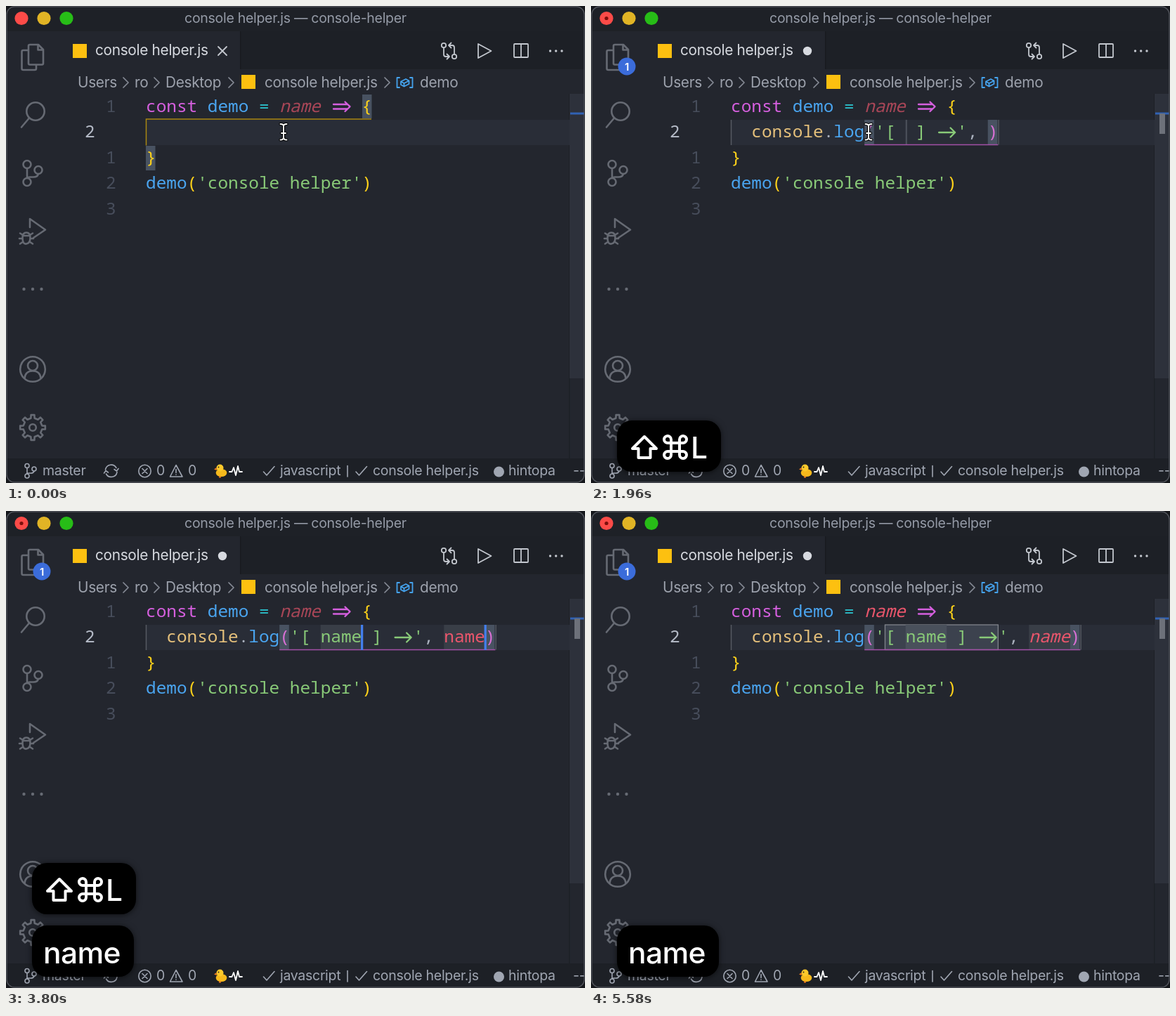
An HTML page for the animation above (5680 ms loop, 824 by 679 pixels).

```html
<!DOCTYPE html>
<html lang="en">
<head>
<meta charset="utf-8">
<title>Console helper demo</title>
<style>
  html, body { margin: 0; width: 100%; height: 100%; overflow: hidden; background: #15171b; }
  svg { display: block; position: absolute; left: 0; top: 0; }
  text { white-space: pre; font-family: Inter, "Open Sans", sans-serif; letter-spacing: -.015em; }
  .code text { font: 500 24.4px "Noto Sans Mono", "DejaVu Sans Mono", monospace; letter-spacing: 0; }
  .code .italic { font-style: italic; }
  .line { fill: none; stroke-linejoin: round; stroke-linecap: round; }
  .side { stroke: #666a73; stroke-width: 2.6; }
  .tool { stroke: #c3c7ce; stroke-width: 1.8; }
  .tab { font-size: 20.8px; fill: #d7dae0; }
  .crumb { font-size: 20.8px; fill: #9da2ad; }
  .status { font-size: 19.5px; fill: #a0a6b2; }
  .state { stroke: #a0a6b2; stroke-width: 1.6; }
  .keys text { font-size: 42.5px; font-weight: 500; fill: #fff; }
  .keys rect { filter: drop-shadow(0 1px 4px rgba(0, 0, 0, .6)); }
</style>
</head>
<body>
<svg width="824" height="679" viewBox="0 0 824 679">
  <!-- window -->
  <rect x=".75" y=".75" width="822.5" height="677.5" rx="11" fill="#23262e"/>
  <path d="M1 36V12Q1 1 12 1H812Q823 1 823 12V36Z" fill="#1e2127"/>
  <rect x="334" y="36" width="489" height="54" fill="#1d2026"/>
  <rect x="333" y="36" width="1.5" height="54" fill="#181a1f"/>
  <path d="M1 644H823V667Q823 678 812 678H12Q1 678 1 667Z" fill="#1d2026"/>

  <!-- title bar -->
  <circle cx="22" cy="17.5" r="9.6" fill="#fc4b48"/>
  <circle cx="22" cy="17.5" r="2.6" fill="#7d0f0c" data-on="160"/>
  <circle cx="54" cy="17.5" r="9.6" fill="#e1b425"/>
  <circle cx="86" cy="17.5" r="9.6" fill="#27bd17"/>
  <text x="412" y="24" text-anchor="middle" font-size="19.5" fill="#959ba7">console helper.js — console-helper</text>

  <!-- tab -->
  <rect x="95" y="54" width="20" height="20" fill="#fdc010"/>
  <text class="tab" x="127" y="70">console helper.js</text>
  <path class="line tool" d="M302 58L314 70M314 58L302 70" data-on="0 160"/>
  <circle cx="308" cy="64" r="6.2" fill="#d7dae0" data-on="160"/>

  <!-- editor actions -->
  <g class="line tool">
    <circle cx="623" cy="56" r="3.2"/><circle cx="638" cy="72" r="3.2"/>
    <path d="M623 59.5V69Q623 72 626 72H631M627.5 68.5L631 72L627.5 75.5"/>
    <path d="M638 68.5V59Q638 56 635 56H630M633.5 52.5L630 56L633.5 59.5"/>
    <path d="M672 54V74L690.5 64Z"/>
    <rect x="723" y="54" width="20" height="19" rx="1"/><path d="M733 54V73"/>
  </g>
  <g fill="#c3c7ce"><circle cx="774.5" cy="64" r="1.7"/><circle cx="782.7" cy="64" r="1.7"/><circle cx="791" cy="64" r="1.7"/></g>

  <!-- breadcrumbs -->
  <g class="crumb">
    <text x="102" y="116">Users</text><text x="183" y="116">ro</text>
    <text x="227" y="116">Desktop</text><text x="368" y="116">console helper.js</text>
    <text x="589" y="116">demo</text>
  </g>
  <path class="line" stroke="#858a95" stroke-width="1.7" d="M167 102l7 7l-7 7M211 102l7 7l-7 7M317 102l7 7l-7 7M539 102l7 7l-7 7"/>
  <rect x="335" y="98" width="20" height="20" fill="#fdc010"/>
  <path class="line" stroke="#45a3ee" stroke-width="1.8" d="M560 102H556.5V116H560M575 102H578.5V116H575M562 107.5L569 104L573.5 106.5V111L566.5 114.5L562 112ZM562 107.5L566.5 110L573.5 106.5M566.5 110V114.5"/>

  <!-- activity bar -->
  <g class="line side">
    <path d="M32 63H24.5Q22.5 63 22.5 65V89Q22.5 91 24.5 91H41Q43 91 43 89V84M34 55H46L53 62V81.5Q53 83.5 51 83.5H34Q32 83.5 32 81.5V57Q32 55 34 55ZM45.5 55V62.5H53"/>
    <circle cx="42" cy="150" r="12.7"/><path d="M33 159.5L22 172.5"/>
    <circle cx="30" cy="225.5" r="5.5"/><circle cx="46" cy="233.5" r="5.5"/><circle cx="30" cy="250.5" r="5.5"/>
    <path d="M30 231V245M46 239Q45 243.5 39 243.5H34Q31 243.5 30 245"/>
    <path d="M34 315V303L56 318.5L39 330"/>
    <path d="M23.5 330Q23.5 322.5 29 322.5T34.5 330T29 338.5T23.5 330ZM23.5 327H34.5M20 323.5L24 326M38 323.5L34 326M19 331H23.5M39 331H34.5M20 338.5L24.5 335.5M38 338.5L33.5 335.5"/>
    <circle cx="38" cy="517" r="17.8"/><circle cx="38" cy="512" r="7"/><path d="M26.5 530Q27.5 519.5 38 519.5T49.5 530"/>
    <path id="gear"/><circle cx="38" cy="600" r="4.8"/>
  </g>
  <g fill="#666a73"><circle cx="25.5" cy="403" r="2.2"/><circle cx="38" cy="403" r="2.2"/><circle cx="50.5" cy="403" r="2.2"/></g>
  <g data-on="160">
    <circle cx="51" cy="86" r="12.5" fill="#3b6cda"/>
    <text x="51" y="91.5" text-anchor="middle" font-size="15" font-weight="600" fill="#fff">1</text>
  </g>

  <!-- scroll bar -->
  <rect x="801" y="125" width="1.5" height="519" fill="#1d2026"/>
  <rect x="802" y="125" width="21" height="405" fill="#2d313b"/>
  <rect x="803" y="151.5" width="20" height="3" fill="#3162b4"/>
  <rect x="809" y="153" width="8" height="29" fill="#6d717a" data-on="560"/>

  <!-- editor -->
  <rect x="199" y="162" width="603" height="36" fill="#292d37"/>
  <g data-on="0 720">
    <rect x="507" y="126" width="13.5" height="34" fill="#485261"/>
    <rect x="199" y="199" width="13.5" height="35" fill="#485261"/>
    <path d="M520 161H199.5V198.5" fill="none" stroke="#a98712" stroke-width="1.5"/>
  </g>
  <path d="M199.5 162V198" stroke="#565a63" stroke-width="1.5" data-on="720"/>
  <g id="marks"></g>
  <g class="code" id="fixed"></g>
  <g class="code" id="typed"></g>
  <g id="carets" fill="#437fee"><rect y="162" width="3.2" height="36"/><rect y="162" width="3.2" height="36"/></g>
  <g class="line" data-on="0 2560">
    <path id="beam" d="M390.5 168Q395 168 395 171Q395 168 399.5 168M395 171V187M390.5 190.5Q395 190.5 395 187Q395 190.5 399.5 190.5M392 181H398"/>
    <use href="#beam" stroke="#000" stroke-width="4.2"/>
    <use href="#beam" stroke="#fff" stroke-width="1.9"/>
  </g>

  <!-- status bar -->
  <g class="line state">
    <circle cx="30" cy="654.5" r="3"/><circle cx="40" cy="659" r="3"/><circle cx="30" cy="669" r="3"/>
    <path d="M30 657.5V666M40 662Q39.5 665 35 665H32Q30 665 30 666"/>
    <path d="M141.5 660A8.3 8.3 0 0 1 157 657.5M158 663.5A8.3 8.3 0 0 1 142.5 666M160 658.5L157.5 662L154 659.5M139.5 665L142 661.5L145.5 664"/>
    <circle cx="197.5" cy="662" r="8.7"/><path d="M194 658.5L201 665.5M201 658.5L194 665.5"/>
    <path d="M242 653.5L251 670H233.5ZM242 659.5V664.5M242 667V667.3"/>
    <path d="M366.5 663L371 668L382 655.5M498 663L502.5 668L513.5 655.5"/>
    <path d="M486 654.5V670"/>
  </g>
  <g class="status">
    <text x="52" y="668">master</text><text x="214" y="668">0</text><text x="259" y="668">0</text>
    <text x="390" y="668">javascript</text><text x="522" y="668">console helper.js</text>
    <text x="715" y="668">hintopa</text><text x="807" y="668">--</text>
  </g>
  <circle cx="701.5" cy="663" r="7.5" fill="#a0a6b2"/>
  <ellipse cx="306.500" cy="664.5" rx="7.8" ry="5.5" fill="#f6b91c"/>
  <circle cx="304.5" cy="657.5" r="5" fill="#fbc92b"/>
  <path d="M299.5 657L296 659.5L300 661ZM303 669.5h3v2h-3Z" fill="#ee7a22"/>
  <circle cx="302.5" cy="656.5" r=".9" fill="#222"/>
  <path class="line" stroke="#fff" stroke-width="1.8" d="M318 663H321.5L324 657L327 668L330 655L332 663H336"/>

  <rect x="1" y="1" width="822" height="677" rx="11" fill="none" stroke="#50535a" stroke-width="1.4"/>

  <!-- pressed keys -->
  <g class="keys" id="chord">
    <rect x="37" y="590" width="148" height="73" rx="21"/>
    <g class="line" stroke="#fff" stroke-width="4">
      <path d="M76 613L93 630H84.5V643H67.5V630H59Z"/>
      <path d="M114 622H126V634H114ZM114 622H109.5A5 5 0 1 1 114 617ZM126 622V617A5 5 0 1 1 130.5 622ZM126 634H130.5A5 5 0 1 1 126 639ZM114 634V639A5 5 0 1 1 109.5 634Z"/>
    </g>
    <text x="142" y="644">L</text>
  </g>
  <g class="keys" id="word">
    <rect x="37" y="590" height="73" rx="21"/>
    <text x="53" y="644"></text>
  </g>
</svg>
<script>
const LOOP = 5680, LEFT = 199, CELL = 14.63, ROW = 36.4;
const INSERT = 160, FOCUS = 720, ITALIC = 4100, USED = 4700, BOXED = 5300;
const TYPED = [2580, 3220, 3340, 3780];   // letters reach the editor
const PRESSED = [2560, 3200, 3320, 3740]; // letters reach the key display
const WORD_WIDTH = [0, 59, 84, 120, 145];
const FADE = [4900, 5200];

const C = { key: '#d55fde', fn: '#4aa5f0', op: '#2bbac5', arg: '#ea566c', str: '#89ca78',
  gold: '#ffd21a', pink: '#da70d6', plain: '#abb2bf', obj: '#e5c07b', num: '#474d5b' };

const $ = id => document.getElementById(id);
const colX = col => LEFT + col * CELL;
const baseY = row => 151 + row * ROW;
const count = (times, t) => times.filter(at => t >= at).length;

const text = (col, row, str, color, extra = '') =>
  `<text x="${colX(col)}" y="${baseY(row)}" fill="${color}" ${extra}>${str}</text>`;
const rect = (col, cols, fill, extra = '') =>
  `<rect x="${colX(col)}" y="162" width="${cols * CELL}" height="35.5" fill="${fill}" ${extra}/>`;
const stroke = (d, color) =>
  `<path class="line" d="${d}" stroke="${color}" stroke-width="2.3"/>`;
const italic = 'class="italic"';

function drawFixed() {
  const number = (x, row, n, color) =>
    `<text x="${x}" y="${baseY(row)}" fill="${color}">${n}</text>`;
  $('fixed').innerHTML =
    number(142, 0, 1, C.num) + number(112, 1, 2, '#b4bac6') + number(142, 2, 1, C.num) +
    number(142, 3, 2, C.num) + number(142, 4, 3, C.num) +
    text(0, 0, 'const', C.key) + text(6, 0, 'demo', C.fn) + text(11, 0, '=', C.op) +
    text(13, 0, 'name', C.arg, italic + ' id="param"') +
    stroke('M466 140H485.5M466 146.5H485.5M482.5 136.5L489.5 143.2L482.5 150', C.key) +
    text(21, 0, '{', C.gold) + text(0, 2, '}', C.gold) +
    text(0, 3, 'demo', C.fn) + text(4, 3, '(', C.gold) +
    text(5, 3, "'console helper'", C.str) + text(21, 3, ')', C.gold);

  const teeth = [];
  for (let i = 0; i < 8; i++) {
    for (const [turn, r] of [[-.25, 13.5], [-.17, 18], [.17, 18], [.25, 13.5]]) {
      const a = (i + turn) * Math.PI / 4;
      teeth.push(`${38 + r * Math.sin(a)} ${600 - r * Math.cos(a)}`);
    }
  }
  $('gear').setAttribute('d', `M${teeth.join('L')}Z`);
}

function drawTyped(t, n) {
  if (t < INSERT) {
    $('typed').innerHTML = $('marks').innerHTML = '';
    return;
  }
  const focus = t >= FOCUS, word = 'name'.slice(0, n);
  const paren = focus ? C.pink : C.plain, end = 25 + 2 * n;
  const ax = colX(20 + n) + 3.5;

  $('typed').innerHTML =
    text(2, 1, 'console', focus ? C.obj : C.arg) + text(9, 1, '.', C.plain) +
    text(10, 1, 'log', C.fn) + text(13, 1, '(', paren) +
    text(14, 1, `'[ ${word} ]`, C.str) +
    stroke(`M${ax} 180h23M${ax + 16.5} 173.5l6.5 6.5l-6.5 6.5`, C.str) +
    text(22 + n, 1, "'", C.str) + text(23 + n, 1, ',', C.plain) +
    text(25 + n, 1, word, C.arg, t >= ITALIC ? italic : '') + text(end, 1, ')', paren);

  let marks = '';
  if (t >= BOXED) marks += rect(15, 7 + n, '#3c424e', 'stroke="#80848c" stroke-width="1.3"');
  marks += n ? rect(17, n, t >= BOXED ? '#49505b' : '#393e47') + rect(25 + n, n, '#393e47')
             : rect(17, .15, '#4b5059');
  if (focus) {
    marks += rect(13, .93, '#485261') + rect(end, .93, '#485261') +
      `<path d="M${colX(13)} 197.5H${colX(end + 1)}" stroke="#a24fa6" stroke-width="1.6"/>`;
  }
  marks += rect(end + 1, .1, '#53575f');
  $('marks').innerHTML = marks;
}

// Solid for half a second after input, then a smooth one-second blink.
function caretOpacity(t) {
  const last = [INSERT, ...TYPED].filter(at => t >= at).pop();
  if (last === undefined) return 0;
  const dt = t - last - 500;
  if (dt < 0) return 1;
  const phase = dt % 1000;
  const p = Math.min(phase, 1000 - phase) / 500;
  const u = Math.min(1, Math.max(0, (p - .2) / .4));
  return 1 - u * u * (3 - 2 * u);
}

function drawKeys(t) {
  const n = count(PRESSED, t);
  const fade = (t - FADE[0]) / (FADE[1] - FADE[0]);
  $('chord').style.opacity = t < 100 ? 0 : 1 - Math.min(1, Math.max(0, fade));
  $('chord').setAttribute('transform', `translate(0 ${n ? -89 : 0})`);
  $('word').style.opacity = n ? 1 : 0;
  $('word').children[0].setAttribute('width', WORD_WIDTH[n]);
  $('word').children[1].textContent = 'name'.slice(0, n);
}

const timed = [...document.querySelectorAll('[data-on]')].map(el => {
  const [from, to = LOOP] = el.dataset.on.split(' ').map(Number);
  return { el, from, to };
});
const start = performance.now();
let shown = '';

function render() {
  const t = (performance.now() - start) % LOOP;
  const n = count(TYPED, t);
  const stage = [n, count([INSERT, FOCUS, ITALIC, BOXED], t)].join();
  if (stage !== shown) drawTyped(t, n);
  shown = stage;

  for (const { el, from, to } of timed)
    el.style.visibility = t >= from && t < to ? 'visible' : 'hidden';
  $('param').style.opacity = t >= USED ? 1 : .67;
  [17 + n, 25 + 2 * n].forEach((col, i) =>
    $('carets').children[i].setAttribute('x', colX(col) - 1.2));
  $('carets').style.opacity = caretOpacity(t);
  drawKeys(t);
  requestAnimationFrame(render);
}

drawFixed();
render();
</script>
</body>
</html>
```
